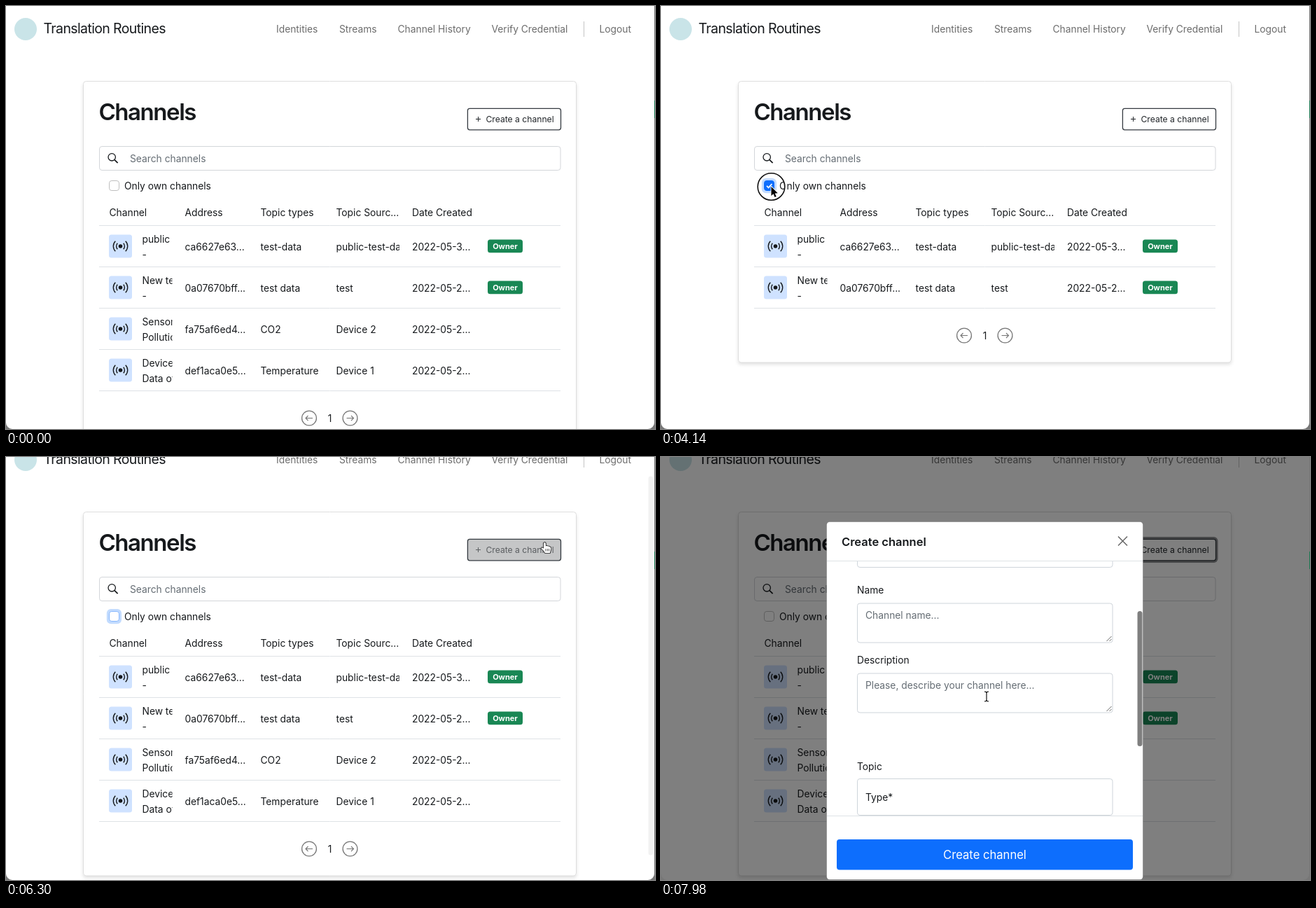
An HTML page with a canvas that plays this animation: 927x604 px, repeating every 8 s.

```html
<!DOCTYPE html>
<html lang="en">
<head>
<meta charset="utf-8">
<style>
  html, body { margin: 0; width: 100%; height: 100%; overflow: hidden; background: #fff; }
  canvas { display: block; }
</style>
</head>
<body>
<canvas id="stage" width="927" height="604"></canvas>
<script>
const W = 927, H = 604, LOOP = 8000;
const INK = '#16191c', LINE = '#dee2e6', MUTED = '#656d74', BLUE = '#0d6efd';
const COLLAPSE = 2880, EXPAND = 4260, CHECK = 2790, UNCHECK = 4170;
const PRESS = 6600, DIM = 6744, OPEN = 6757;

const main = document.getElementById('stage').getContext('2d');
const layerCanvas = document.createElement('canvas');
layerCanvas.width = W;
layerCanvas.height = H;
const layer = layerCanvas.getContext('2d');
let c = main;

const clamp = v => Math.max(0, Math.min(1, v));
const ramp = (t, a, b) => clamp((t - a) / (b - a));
const smooth = p => p * p * (3 - 2 * p);
const mix = (a, b, p) => a + (b - a) * p;

// keys: [time, value, value, ...]
function track(keys, t) {
  let i = 0;
  while (i < keys.length - 2 && t >= keys[i + 1][0]) i++;
  const [a, b] = [keys[i], keys[i + 1]];
  const p = smooth(ramp(t, a[0], b[0]));
  return a.slice(1).map((v, k) => mix(v, b[k + 1], p));
}

const POINTER = [
  [0, 240, 612], [300, 240, 612], [810, 230, 400], [1110, 230, 400], [1710, 159, 252],
  [2760, 159, 252], [3450, 157.5, 258], [4500, 157.5, 258], [4920, 261.5, 198.5],
  [5520, 261.5, 198.5], [6300, 769, 122], [6480, 759.5, 126], [7230, 759.5, 126], [7590, 465, 342]
];
const PAGE_SCROLL = [[0, 0], [4830, 0], [4950, 31], [5040, 31.5], [5220, 29]];
const CLICKS = [2760, 4140, PRESS];

const ROWS = [
  ['public test', '-', 'ca6627e63...', 'test-data', 'public-test-data', '2022-05-3...', true],
  ['New test', '-', '0a07670bff...', 'test data', 'test', '2022-05-2...', true],
  ['Sensor data', 'Pollution', 'fa75af6ed4...', 'CO2', 'Device 2', '2022-05-2...', false],
  ['Device data', 'Data of it', 'def1aca0e5...', 'Temperature', 'Device 1', '2022-05-2...', false]
];
const COLUMNS = [255.5, 363.5, 471.5, 580];

// Text is placed by the vertical centre of its capitals.
function text(s, x, cy, { size = 13.8, weight = 400, color = INK, gap = 0, align = 'left' } = {}) {
  c.font = `${weight} ${size}px Inter, "Open Sans", sans-serif`;
  c.letterSpacing = gap + 'px';
  c.fillStyle = color;
  c.textAlign = align;
  c.fillText(s, x, cy + size * 0.364);
}

function box(x, y, w, h, r, fill, stroke, lw = 1) {
  c.beginPath();
  c.roundRect(x, y, w, h, r);
  if (fill) { c.fillStyle = fill; c.fill(); }
  if (stroke) { c.strokeStyle = stroke; c.lineWidth = lw; c.stroke(); }
}

function poly(points, color, lw) {
  c.beginPath();
  points.forEach(([x, y]) => c.lineTo(x, y));
  c.strokeStyle = color;
  c.lineWidth = lw;
  c.stroke();
}

function ring(x, y, r, color, lw, from = 0, to = Math.PI * 2) {
  c.beginPath();
  c.arc(x, y, r, from, to);
  c.strokeStyle = color;
  c.lineWidth = lw;
  c.stroke();
}

function disc(x, y, r, color) {
  c.beginPath();
  c.arc(x, y, r, 0, Math.PI * 2);
  c.fillStyle = color;
  c.fill();
}

function clipTo(x, y, w, h, draw) {
  c.save();
  c.beginPath();
  c.rect(x, y, w, h);
  c.clip();
  draw();
  c.restore();
}

function navigation() {
  disc(28, 33, 16, '#c9e4e8');
  text('Translation Routines', 53.5, 32, { size: 19.5, gap: -0.62 });
  const items = [['Identities', 386], ['Streams', 476], ['Channel History', 559.5],
    ['Verify Credential', 693.5], ['Logout', 847.5]];
  items.forEach(([s, x]) => text(s, x, 32.5, { color: '#6c6c6c' }));
  poly([[825.5, 22], [825.5, 44]], '#c4c4c4', 1);
}

function checkbox(t) {
  const checked = t >= CHECK && t < UNCHECK;
  const focused = t >= CLICKS[0] && t < PRESS;
  if (focused) box(143.8, 246, 21.2, 21.2, 6, '#c2dbfe');
  box(147.5, 249.5, 14, 14, 3.4, checked ? BLUE : '#fff',
    checked ? BLUE : focused ? '#86b7fe' : '#bfbfbf');
  if (checked) poly([[151, 256.8], [153.6, 259.4], [158.4, 254]], '#fff', 1.8);
}

function broadcast(x, y) {
  disc(x, y, 2.8, INK);
  for (const r of [5.9, 10.2])
    for (const side of [0, Math.PI])
      ring(x, y, r, INK, 1.4, side - 0.785, side + 0.785);
}

function tableRow(row, y) {
  const [name, note, address, type, source, date, owned] = row;
  box(147, y - 16.5, 33, 33, 3.5, '#cfe2ff');
  broadcast(163.5, y);
  clipTo(190, y - 28, 47.5, 56, () => {
    text(name, 194.5, y - 10.5);
    text(note, 194.5, y + 11.5);
  });
  [address, type, source, date].forEach((s, i) =>
    clipTo(COLUMNS[i], y - 20, 90.5, 40, () => text(s, COLUMNS[i], y + 0.5)));
  if (owned) {
    box(688, y - 9.5, 50, 18.8, 3.5, '#198754');
    text('Owner', 713, y + 0.3, { size: 11, weight: 700, color: '#fff', align: 'center' });
  }
  poly([[133, y + 29.5], [792, y + 29.5]], LINE, 1);
}

function createButton(t) {
  const hover = ramp(t, 6262, 6412) * (1 - ramp(t, 6740, 6860));
  const shade = (from, to) => `rgb(${from.map((v, i) => Math.round(mix(v, to[i], hover)))})`;
  const white = [255, 255, 255], dark = [33, 37, 41];
  const ink = shade(dark, white);
  if (t >= PRESS) box(656.5, 143, 139, 37, 6, 'rgba(33,37,41,.5)');
  box(659.4, 146.4, 133.1, 30.4, 3, shade(white, dark), '#343a40', 1.3);
  poly([[671, 161.5], [678, 161.5]], ink, 1);
  poly([[674.5, 158], [674.5, 165]], ink, 1);
  text('Create a channel', 685.5, 161.5, { size: 12.15, color: ink });
}

function pager(y) {
  for (const [x, d] of [[433, -1], [491.5, 1]]) {
    ring(x, y, 10.4, '#777', 1.3);
    poly([[x - 5 * d, y], [x + 5 * d, y]], '#777', 1.1);
    poly([[x + 1.5 * d, y - 3.5], [x + 5 * d, y], [x + 1.5 * d, y + 3.5]], '#777', 1.1);
  }
  text('1', 462.5, y + 0.5, { align: 'center' });
}

function page(t) {
  const count = t >= COLLAPSE && t < EXPAND ? 2 : 4;
  const bottom = 391 + 59 * count;
  navigation();

  c.save();
  c.shadowColor = 'rgba(0,0,0,.12)';
  c.shadowBlur = 5;
  c.shadowOffsetY = 3;
  box(110, 107.5, 705, bottom - 107.5, 4, '#fff');
  c.restore();
  box(110.5, 107.5, 704, bottom - 107.5, 4, '#fff', '#dedede');

  text('Channels', 132.5, 151, { size: 33, weight: 600, gap: -1.45 });
  createButton(t);
  box(133.5, 200.5, 658.5, 34, 3.6, '#fff', '#d3d6da');
  ring(151.2, 215.8, 5.2, INK, 1.3);
  poly([[155, 219.6], [159.6, 224.2]], INK, 1.7);
  text('Search channels', 177, 217.5, { color: MUTED });
  checkbox(t);
  text('Only own channels', 169, 257);

  ['Channel', 'Address', 'Topic types', 'Topic Sourc...', 'Date Created'].forEach((s, i) =>
    text(s, i ? COLUMNS[i - 1] : 147.5, 295));
  poly([[133, 313.5], [792, 313.5]], LINE, 1);
  ROWS.slice(0, count).forEach((row, i) => tableRow(row, 343 + 59 * i));
  pager(352.5 + 59 * count);
}

function field(y, h, label, value, color = INK) {
  text(label, 280, y - 18.5);
  box(280.5, y + 0.5, 364.5, h, 3.6, '#fff', '#ced4da');
  text(value, 292, y + 17.5, { color });
}

function textarea(y, label, hint) {
  field(y, 56, label, hint, MUTED);
  poly([[636.5, y + 54.5], [643.5, y + 47.5]], '#666', 1);
  poly([[640.5, y + 54.5], [643.5, y + 51.5]], '#666', 1);
}

function modal(scroll, barAlpha) {
  box(236.5, 92.5, 452, 511, 4.5, '#fff', 'rgba(0,0,0,.2)');
  text('Create channel', 258, 120.5, { size: 16.5, weight: 600 });
  poly([[653, 113.5], [666, 126.5]], '#666', 1.5);
  poly([[666, 113.5], [653, 126.5]], '#666', 1.5);

  clipTo(237, 149, 451, 363, () => {
    c.translate(0, -scroll);
    field(251, 34, 'Channel Type', 'Private Channel');
    poly([[621.5, 266], [626, 270.5], [630.5, 266]], '#343a40', 1.6);
    textarea(336.5, 'Name', 'Channel name...');
    textarea(436.5, 'Description', 'Please, describe your channel here...');
    text('Topic', 280, 569.5);
    box(280.5, 587.5, 364.5, 52, 3.6, '#fff', '#ced4da');
    text('Type*', 292, 614);
    c.translate(0, scroll);
    if (barAlpha) box(680.5, 151 + scroll * 0.54, 7, 193, 3.5, `rgba(0,0,0,${0.5 * barAlpha})`);
  });
  poly([[237, 148.5], [688, 148.5]], LINE, 1);
  poly([[237, 512.5], [688, 512.5]], LINE, 1);
  box(251, 546, 423, 43.5, 4, BLUE);
  text('Create channel', 462.5, 568, { size: 16.6, color: '#fff', align: 'center' });
}

function dialog(t) {
  const dim = ramp(t, DIM, DIM + 150);
  if (!dim) return;
  main.fillStyle = `rgba(0,0,0,${0.5 * dim})`;
  main.fillRect(0, 0, W, H);

  layer.clearRect(0, 0, W, H);
  c = layer;
  modal(128 * smooth(ramp(t, 7815, 7980)), ramp(t, 7820, 7850));
  c = main;
  const rest = Math.pow(1 - ramp(t, OPEN, OPEN + 300), 1.9);
  c.globalAlpha = ramp(t, OPEN, OPEN + 150);
  c.drawImage(layerCanvas, 0, -Math.round(50 * rest));
  c.globalAlpha = 1;
}

function shape(points, fill, stroke, lw) {
  c.beginPath();
  points.forEach(([x, y]) => c.lineTo(x, y));
  c.closePath();
  c.lineJoin = 'round';
  c.strokeStyle = stroke;
  c.lineWidth = lw;
  c.stroke();
  c.fillStyle = fill;
  c.fill();
}

function arrow() {
  shape([[0, 0], [0, 13], [3, 10.3], [5, 15], [7.2, 14], [5.2, 9.6], [9.2, 9.3]], '#000', '#fff', 1.8);
}

function hand() {
  shape([[-1, 0.8], [0.6, 0], [1.8, 1], [2, 5.2], [4, 4.8], [5, 5.6], [6.8, 5.5], [7.6, 6.4],
    [9, 6.8], [9.4, 9], [8, 15], [1, 15], [-1, 12], [-4.5, 8.5], [-3.6, 7.2], [-1, 8.6]],
    '#fff', '#222', 1.7);
  for (const x of [2, 4.4, 6.6]) poly([[x, 9], [x, 12.5]], '#333', 0.8);
}

function beam() {
  for (const [color, lw] of [['#fff', 3], ['#111', 1.2]]) {
    poly([[0, -6], [0, 6]], color, lw);
    poly([[-3, -7], [-1, -6.6], [0, -5.6], [1, -6.6], [3, -7]], color, lw);
    poly([[-3, 7], [-1, 6.6], [0, 5.6], [1, 6.6], [3, 7]], color, lw);
  }
}

function pointer(t) {
  const [x, y] = track(POINTER, t);
  c.save();
  c.translate(x, y);
  for (const start of CLICKS) {
    if (t < start || t > start + 190) continue;
    c.globalAlpha = 1 - ramp(t, start + 120, start + 190);
    ring(0, 0, 20.5, '#fff', 2);
    ring(0, 0, 19.3, '#111', 1.6);
  }
  c.globalAlpha = 1;
  if (t >= 7550) beam();
  else if (t >= 6240 && t < 6780) hand();
  else arrow();
  c.restore();
}

function pageScrollbar(t, scroll) {
  const alpha = ramp(t, 4820, 4860) * mix(0.5, 0.05, ramp(t, 5520, 5800)) * (1 - ramp(t, 6300, 6420));
  if (alpha) box(917.5, 2 + scroll * 0.88, 6.5, 541, 3.2, `rgba(0,0,0,${alpha})`);
}

function windowEdge() {
  c.beginPath();
  c.rect(0, 0, W, H);
  c.roundRect(0, -20, 926, 624, 9);
  c.fillStyle = '#777';
  c.fill('evenodd');
  c.fillStyle = '#1b7a52';
  c.fillRect(926, 135, 1, 25);
}

function draw(t) {
  c.fillStyle = '#fff';
  c.fillRect(0, 0, W, H);
  const [scroll] = track(PAGE_SCROLL, t);
  c.save();
  c.translate(0, -scroll);
  page(t);
  c.restore();
  pageScrollbar(t, scroll);
  dialog(t);
  windowEdge();
  pointer(t);
}

const begin = performance.now();
function tick() {
  draw((performance.now() - begin) % LOOP);
  requestAnimationFrame(tick);
}
tick();
</script>
</body>
</html>
```
